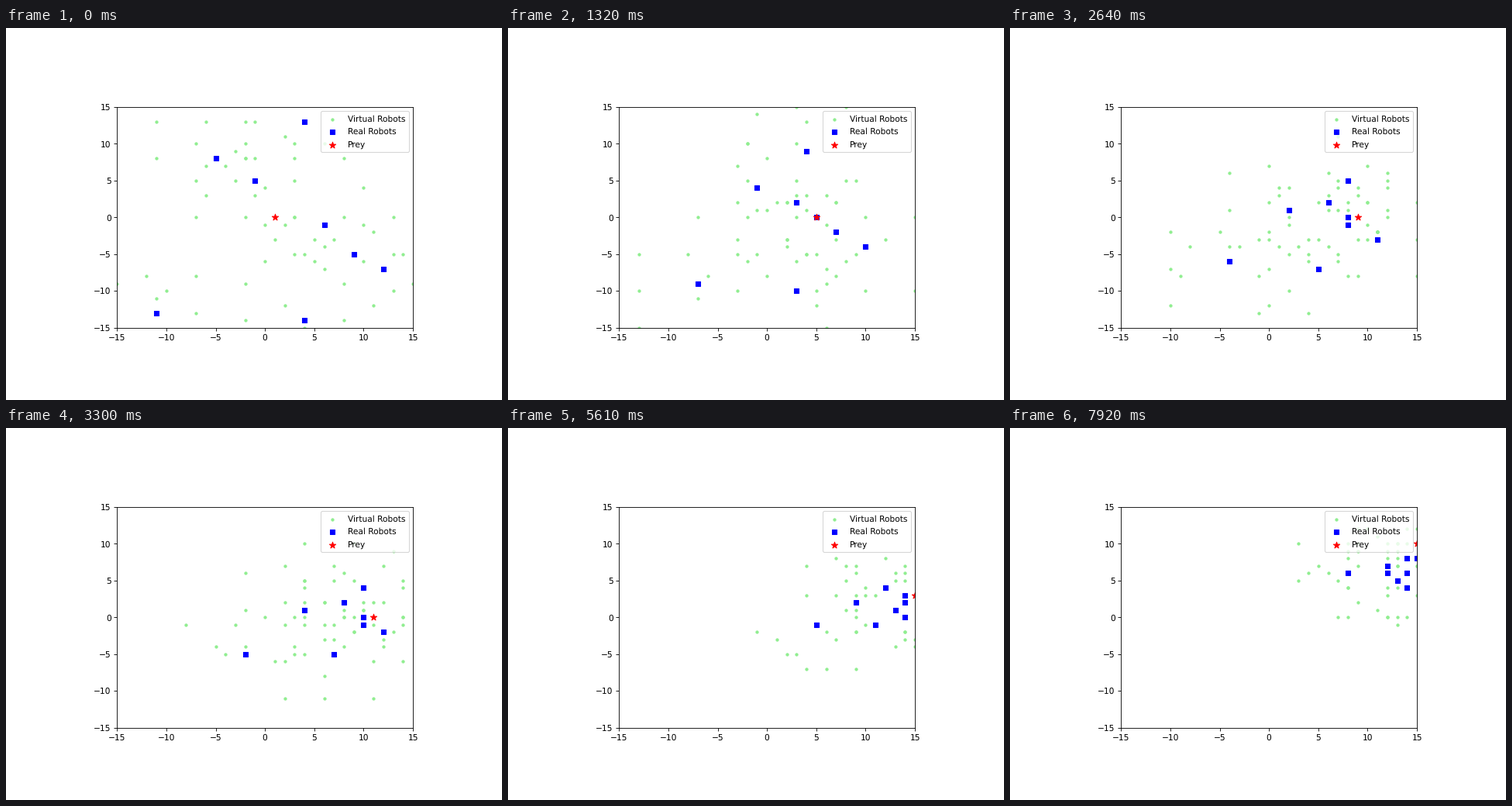
A matplotlib script that plays this animation: 640 px wide and 480 px high, repeating every 8000 ms.

```python
import itertools

import numpy as np
import matplotlib.pyplot as plt
from matplotlib.animation import FuncAnimation

STEP_MS = 330
TICK_MS = 20
LOOP_MS = 8000
LAST_STEP = (LOOP_MS - 1) // STEP_MS
SCALE = 0.77  # the plot is a default figure shrunk onto the stage
REACH = 5     # spacing between a robot and its virtual neighbours
AROUND = [d for d in itertools.product((-REACH, 0, REACH), repeat=2) if any(d)]

# Key cells of each real robot; between them it walks straight.
KNOTS = [0, 6, 14, 20, 24]
PATHS = np.array([
    [(-11, -13), (-5, -7), (2, -3), (8, 2), (8, 6)],
    [(-5, 8), (1, 2), (8, 1), (11, 4), (12, 7)],
    [(-1, 5), (5, 2), (12, 3), (12, 5), (12, 6)],
    [(4, 13), (6, 7), (14, 2), (14, 5), (14, 8)],
    [(6, -1), (7, 1), (13, 0), (13, 3), (13, 5)],
    [(9, -5), (7, -1), (14, 0), (15, 4), (15, 8)],
    [(12, -7), (10, -3), (14, -1), (15, 2), (14, 6)],
    [(4, -14), (4, -8), (10, -2), (13, 0), (14, 4)],
])


def prey_at(step):
    """Runs right along the axis, then up the wall."""
    return np.array([min(1 + step, 15), max(0, step - 14)])


def robot_at(path, step):
    """Opens with a two-step dash at the prey, then follows its path."""
    dash = path[0] + np.clip(prey_at(2) - path[0], -2, 2)
    times = np.insert(KNOTS, 1, 2)
    cells = np.insert(path, 1, dash, axis=0)
    spot = [np.interp(step, times, axis) for axis in cells.T]
    return np.floor(np.add(spot, 1e-9)).astype(int)


def robots_at(step):
    return np.array([robot_at(path, step) for path in PATHS])


def virtual_at(step):
    """Rings around the cells just left, plus a few loose dots."""
    rng = np.random.default_rng(40 + step)
    goal = prey_at(step)
    hubs = robots_at(step - 1) if step else robots_at(0) - (1, 0)
    dots = []
    for hub in hubs:
        for cell in hub + AROUND:
            nearer = np.hypot(*(cell - goal)) < np.hypot(*(hub - goal))
            if rng.random() < (0.9 if nearer else 0.6):
                dots.append(cell)
        dots.extend(hub + rng.integers(-4, 5, (rng.integers(2, 4), 2)))
    return np.array(dots)


for key in ("font.size", "axes.linewidth", "patch.linewidth",
            "xtick.major.size", "xtick.major.width", "xtick.major.pad",
            "ytick.major.size", "ytick.major.width", "ytick.major.pad"):
    plt.rcParams[key] *= SCALE
plt.rcParams["text.hinting"] = "none"

fig = plt.figure(figsize=(6.4, 4.8), dpi=100)
ax = fig.add_axes([0.1275 + 0.125 * SCALE, 0.11 + 0.11 * SCALE,
                   0.775 * SCALE, 0.77 * SCALE])
ax.set(xlim=(-15, 15), ylim=(-15, 15))


def dots(size, color, marker, label):
    return ax.scatter([], [], s=(size * SCALE) ** 2, c=color, marker=marker,
                      linewidths=SCALE, label=label)


virtual = dots(3, "lightgreen", "o", "Virtual Robots")
real = dots(6, "blue", "s", "Real Robots")
prey = dots(8, "red", "*", "Prey")
ax.legend(loc="upper right", labelspacing=0.54, borderpad=0.45,
          scatteryoffsets=[0.35])

SCENES = [(virtual_at(s), robots_at(s), [prey_at(s)])
          for s in range(LAST_STEP + 1)]


def draw(frame):
    step = (frame * TICK_MS + TICK_MS // 2) // STEP_MS
    artists = virtual, real, prey
    for artist, cells in zip(artists, SCENES[min(step, LAST_STEP)]):
        artist.set_offsets(cells)
    return artists


anim = FuncAnimation(fig, draw, frames=LOOP_MS // TICK_MS, interval=TICK_MS,
                     repeat=True, repeat_delay=0)
plt.show()
```
